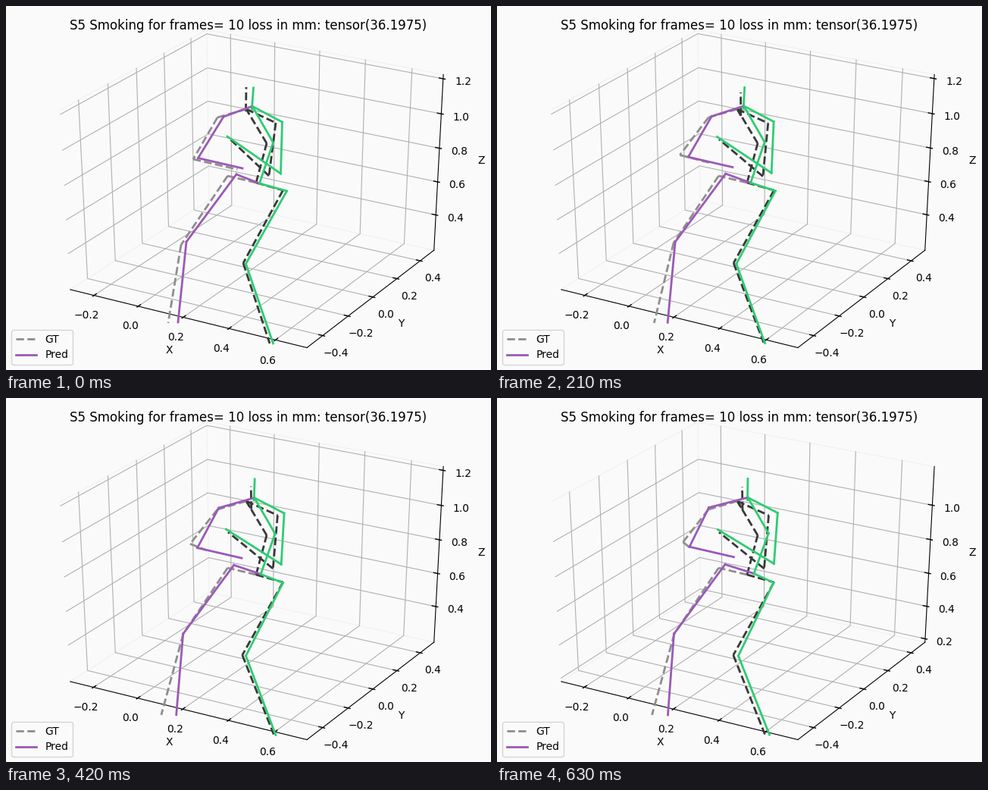
These frames come from a looping animation (640x480 px, 0.7 s). A matplotlib script:

```python
import numpy as np
import matplotlib.pyplot as plt
from matplotlib.animation import FuncAnimation
from matplotlib.lines import Line2D

W, H, FRAMES = 640, 480, 10
BG, GRID, EDGE = "#fafafa", "#b0b0b0", "#f1f1f1"
GRAY, DARK, PURPLE, GREEN = "#8e8e8e", "#383838", "#9b59b6", "#2ecc71"

HALF = 0.5 + 1 / 48          # half width of the drawn cube
DELTA = 1 / 12
PER_POINT = 48 / (72 * (6.4 + 4.8)) * DELTA
TICK_PAD, LABEL_PAD = 11.5 * PER_POINT, 25 * PER_POINT

# Joint chains and whether they belong to the left side.
CHAINS = [
    ("root hip_r knee_r foot_r", False),
    ("root hip_l knee_l foot_l", True),
    ("root spine neck nose head", False),
    ("neck shoulder_l elbow_l hand_l", True),
    ("neck shoulder_r elbow_r hand_r", False),
]

# First pose in stage pixels.
POSE = dict(
    root=(330, 233), spine=(344, 181), neck=(317, 136),
    nose=(316.5, 139), head=(317, 107),
    hip_r=(365.5, 243), knee_r=(313, 339), foot_r=(348, 445),
    hip_l=(292.5, 224), knee_l=(231, 315), foot_l=(214, 418),
    shoulder_l=(279, 147), elbow_l=(247, 202), hand_l=(305.5, 215.5),
    shoulder_r=(356, 154), elbow_r=(347, 224), hand_r=(293, 173),
)

# How far the true joints travel over the loop.
TRAVEL = dict(
    nose=(7.5, 8), head=(6.5, 10), knee_r=(-1.2, 0), foot_r=(5.5, -1.5),
    knee_l=(3, -4), foot_l=(-9.5, 0), elbow_l=(-1.5, -12),
    hand_l=(-51.5, -18.5), shoulder_r=(2.5, 0.7), elbow_r=(5.5, 1),
    hand_r=(0, 4),
)

# Prediction: error against the first pose, then its drift over the loop.
ERROR = {
    "root": (4.5, 1, 4.5, -2.5),
    "hip_r": (5, 1, -5.5, -0.5),
    "knee_r": (3.5, 1, 2, 0),
    "foot_r": (4.5, 0, 7, -1),
    "hip_l": (11.5, -2, -3, -2.5),
    "knee_l": (7, -4, -4.5, 0),
    "foot_l": (13, -1, -1.5, 1),
    "spine shoulder_r": (8.5, -1, 5.8, -1.5),
    "neck nose": (8, -3.8, 6, -1),
    "head": (9.5, 1, 4.5, -1.5),
    "shoulder_l": (8, -1, -7.5, -1.5),
    "elbow_l hand_l": (6.5, -1.5, 0.5, -4.3),
    "elbow_r": (15.5, -3, 3, -2.5),
    "hand_r": (-1, -1, -0.5, 1.5),
}


def true_pose(t):
    """The left arm keeps swinging while the rest soon settles."""
    swing, settle = 1 - (1 - t) ** 1.5, 1 - (1 - t) ** 3
    pose = {}
    for joint, start in POSE.items():
        ease = swing if joint in ("elbow_l", "hand_l") else settle
        pose[joint] = np.add(start, ease * np.array(TRAVEL.get(joint, (0, 0))))
    pose["elbow_l"][0] -= 5 * np.sin(np.pi * swing)
    return pose


def predicted_pose(t):
    sway = -1.5 * np.sin(np.pi * t)
    pose = {}
    for joints, (ex, ey, dx, dy) in ERROR.items():
        for joint in joints.split():
            pose[joint] = np.add(POSE[joint], (ex + dx * t + sway, ey + dy * t))
    return pose


AZIM, ELEV, DIST = np.radians(-60), np.radians(30), 10
ca, sa, ce, se = np.cos(AZIM), np.sin(AZIM), np.cos(ELEV), np.sin(ELEV)
VIEW = np.array([[-sa, ca, 0], [-ca * se, -sa * se, ce], [ca * ce, sa * ce, se]])


def project(points):
    """Perspective view of unit cube points, in stage pixels."""
    u, v, n = VIEW @ np.atleast_2d(points).T
    x, y = u / (DIST - n), v / (DIST - n)
    return (x + 0.095) / 0.185 * W, H - (y + 0.095) / 0.185 * H


def with_axis(axis, value, base):
    point = np.array(base, float)
    point[axis] = value
    return point


fig = plt.figure(figsize=(W / 100, H / 100), dpi=100, facecolor=BG)
ax = fig.add_axes([0, 0, 1, 1])


def line3d(points, color, width=0.8, z=1.0):
    ax.plot(*project(points), color=color, lw=width, zorder=z)


def label(point, text, va):
    x, y = project(point)
    ax.text(x[0], y[0], text, ha="center", va=va, fontsize=10, zorder=1.5)


# Per axis: name, signs of its edge, direction of its ticks,
# and the signs of the three points every grid line runs through.
AXES = [
    ("X", (0, -1, -1), 1, [(0, -1, -1), (0, 1, -1), (0, 1, 1)]),
    ("Y", (1, 0, -1), 0, [(1, 0, -1), (-1, 0, -1), (-1, 0, 1)]),
    ("Z", (1, 1, 0), 0, [(-1, -1, 0), (-1, 1, 0), (1, 1, 0)]),
]


def draw_box(center):
    h = HALF
    for z in (-h, h):
        line3d([(-h, -h, z), (-h, h, z), (h, h, z)], EDGE)
    line3d([(-h, h, -h), (-h, h, h)], EDGE)

    for axis, (name, edge, tick_dir, walls) in enumerate(AXES):
        edge, walls = np.array(edge), np.array(walls) * h
        line3d([with_axis(axis, s * h, edge * h) for s in (-1, 1)], "k", z=1.2)
        label(edge * (h + LABEL_PAD), name, "center")
        for value in np.arange(-3, 8) * 0.2:
            t = value - center[axis]
            if abs(t) > 0.5:
                continue
            line3d([with_axis(axis, t, p) for p in walls], GRID, z=1.1)
            p = with_axis(axis, t, edge * h)
            step = np.zeros(3)
            step[tick_dir] = edge[tick_dir] * DELTA
            line3d([p + 0.1 * step, p - 0.2 * step], "k", 1.0, 1.3)
            text = f"{value:.1f}".replace("-", "\u2212")
            label(with_axis(axis, t, edge * (h + TICK_PAD)), text, "top")


def draw_pose(pose, left, right, style):
    for chain, is_left in CHAINS:
        joints = chain.split()
        for a, b in zip(joints, joints[1:]):
            ax.plot(*zip(pose[a], pose[b]), style, lw=2,
                    color=left if is_left else right, zorder=2)


def draw(i):
    t = i / (FRAMES - 1)
    ax.clear()
    ax.set_axis_off()
    ax.set_xlim(0, W)
    ax.set_ylim(H, 0)
    # The view follows the hips; the height drops past 0.7 late in the loop.
    draw_box((0.212 + 0.0035 * t, 0, 0.703 - 0.0036 * t))
    draw_pose(true_pose(t), GRAY, DARK, "--")
    draw_pose(predicted_pose(t), PURPLE, GREEN, "-")
    ax.text(W / 2, 31, "S5 Smoking for frames= 10 loss in mm: tensor(36.1975)",
            ha="center", va="baseline", fontsize=12)
    ax.legend([Line2D([], [], color=GRAY, ls="--", lw=2),
               Line2D([], [], color=PURPLE, lw=2)],
              ["GT", "Pred"], loc="lower left", facecolor=BG)
    return []


anim = FuncAnimation(fig, draw, frames=FRAMES, init_func=lambda: draw(0),
                     interval=70, repeat=True, repeat_delay=0, blit=False)
plt.show()
```
